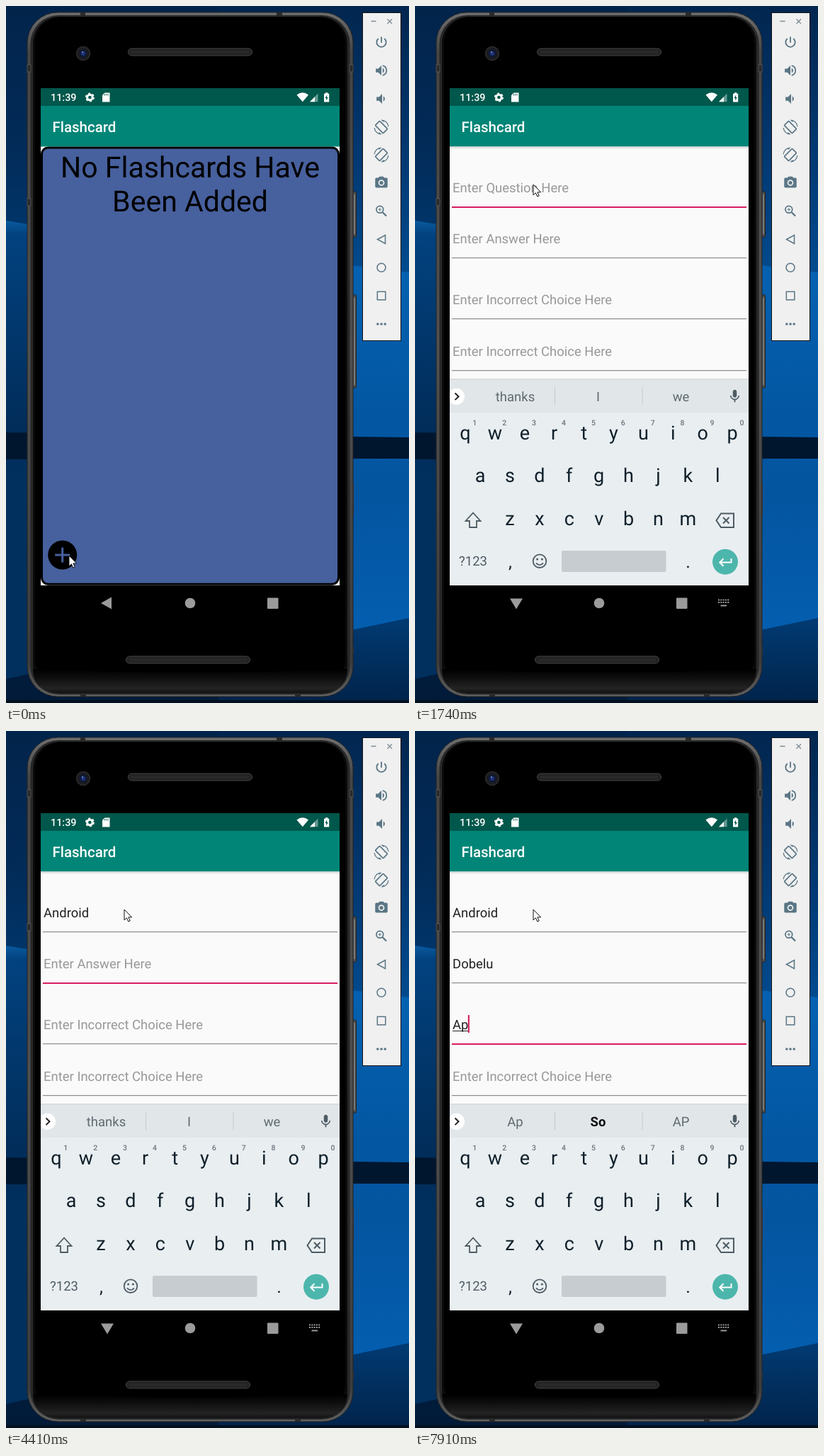
An HTML page for the animation above (8000 ms loop, 569 by 984 pixels).

```html
<!DOCTYPE html>
<html lang="en">
<head>
<meta charset="utf-8">
<title>Flashcard</title>
<style>
html, body { margin: 0; width: 100%; height: 100%; overflow: hidden; background: #000; }
svg { display: block; width: 100%; height: 100%; font-family: Roboto, "Noto Sans", sans-serif; text-rendering: geometricPrecision; }
</style>
</head>
<body>
<svg id="stage" viewBox="0 0 569 984" preserveAspectRatio="none"></svg>
<script>
const LOOP = 8000;
const TEAL = '#008577', PINK = '#d81b60', SLATE = '#5a7685', KEY = '#10202a';

const rect = (x, y, w, h, fill, more = '') => `<rect x="${x}" y="${y}" width="${w}" height="${h}" fill="${fill}" ${more}/>`;
const disc = (x, y, r, fill, more = '') => `<circle cx="${x}" cy="${y}" r="${r}" fill="${fill}" ${more}/>`;
const fill = (d, color, more = '') => `<path d="${d}" fill="${color}" ${more}/>`;
const line = (d, color, width = 2, more = '') => `<path d="${d}" fill="none" stroke="${color}" stroke-width="${width}" ${more}/>`;
const text = (s, x, y, size, color, more = '') => `<text x="${x}" y="${y}" font-size="${size}" fill="${color}" ${more}>${s}</text>`;
const mid = 'text-anchor="middle"';
const group = (id, inner, more = '') => `<g id="${id}" ${more}>${inner}</g>`;
// Icon on a 24 unit grid, centred at x, y
const icon = (x, y, size, inner) => `<g transform="translate(${x - size / 2} ${y - size / 2}) scale(${size / 24})">${inner}</g>`;
const grad = (id, ...stops) => `<linearGradient id="${id}" x1="0" y1="0" x2="0" y2="1">` +
  stops.map(([at, color]) => `<stop offset="${at}" stop-color="${color}"/>`).join('') + '</linearGradient>';

const defs = `<defs>
  ${grad('left', [0, '#02244b'], [.2, '#022b58'], [.31, '#013468'], [1, '#011a38'])}
  ${grad('right', [0, '#02264f'], [.2, '#02376f'], [.38, '#014a8e'], [.85, '#01407c'], [1, '#01234a'])}
  ${grad('leftBeam', [0, '#0a5a9f'], [.03, '#02427f'], [.45, '#012d5a'], [.6, '#01305f'], [1, '#01305e'])}
  ${grad('rightBeam', [0, '#1d8ce4'], [.025, '#0562b2'], [.4, '#0357a2'], [.6, '#0455a0'], [1, '#0460b2'])}
  ${grad('chin', [0, '#000'], [.35, '#0d0d0d'], [.8, '#242424'], [1, '#111'])}
  ${grad('rim', [0, '#6e6e6e'], [.06, '#454545'], [.5, '#505050'], [.95, '#3c3c3c'], [1, '#606060'])}
  ${grad('shade', [0, '#d4d4d4'], [1, '#fafafa'])}
  <clipPath id="screen">${rect(49, 116, 422, 702, '#000')}</clipPath>
  <clipPath id="reveal"><rect id="revealBox" x="49" y="116" width="422" height="718"/></clipPath>
</defs>`;

function wallpaper() {
  return rect(0, 0, 300, 984, 'url(#left)') + rect(300, 0, 269, 984, 'url(#right)') +
    fill('M0 303L300 352V885L0 950z', 'url(#leftBeam)') + fill('M300 343L569 376V864L300 920z', 'url(#rightBeam)') +
    fill('M0 602L569 609V639L0 640z', '#00162f') + rect(0, 980, 569, 4, '#03101f');
}

function slot(x, y) {
  return rect(x, y, 175, 10, '#222', 'rx="5" stroke="#454545"') +
    line(`M${x + 5} ${y + 5}h165`, '#303030', 4, 'stroke-dasharray="1 1"');
}

function phone() {
  const button = (y, h) => rect(488, y, 6.5, h, '#4d4d4d', 'rx="1.5" stroke="#232323"') + rect(491, y + 4, 2, h - 8, '#777');
  const band = (x, y) => rect(x, y, 5, 10, '#2b2b2b', 'stroke="#6a6a6a" stroke-width=".6"');
  return button(262, 64) + button(408, 131) + rect(488, 673, 3, 46, '#4b3b33') + rect(488, 905, 3, 10, '#444') +
    rect(30, 9, 460, 966, 'url(#rim)', 'rx="43" stroke="#222"') +
    rect(34.5, 13, 451, 959, '#262626', 'rx="40"') +
    rect(37.5, 14.5, 445, 954, '#0a0a0a', 'rx="38" stroke="#333" stroke-width=".8"') +
    rect(41, 16, 438, 942, '#000', 'rx="36"') +
    fill('M38 936Q260 946 482 936Q481 968 446 970H74Q39 968 38 936z', 'url(#chin)') +
    band(30, 83) + band(485, 83) + band(30, 272) +
    rect(105, 9, 7, 4, '#2a2a2a') + rect(382, 9, 8, 4, '#2a2a2a') + rect(105, 971, 8, 4, '#2a2a2a') + rect(408, 971, 8, 4, '#2a2a2a') +
    slot(172.5, 60) + slot(169.5, 918) +
    disc(109, 67, 9.5, '#1b1c20', 'stroke="#2c2c2c" stroke-width="1.5"') + disc(109, 67, 5.5, '#0e1838') +
    disc(109, 67, 3, '#1f3578') + disc(108, 65, 1, '#7f93c8');
}

function nav() {
  const gray = '#9b9b9b';
  let dots = '';
  for (const y of [838.5, 842]) dots += line(`M428 ${y}h15.5`, gray, 2, 'stroke-dasharray="2 1.3"');
  return group('navBack', fill('M134 843L149 834.5V851.5z', gray)) +
    disc(260, 843, 7.3, gray) + rect(369, 835.5, 15.5, 15.5, gray, 'rx="1"') +
    group('navKeys', fill('M134 836.5H152L143 851.5z', gray) + dots + line('M431.5 846.5h8.5', gray, 2));
}

function bars() {
  return rect(49, 116, 422, 25, '#00574b') + rect(49, 141, 422, 57.5, TEAL) +
    text('Flashcard', 65.4, 178, 20.5, '#fff', 'font-weight="500"');
}

function home() {
  return rect(49, 198, 422, 640, '#fafafa') + bars() +
    rect(50.5, 200, 419, 616.3, '#47609e', 'rx="9" stroke="#000" stroke-width="3"') +
    text('No Flashcards Have', 260, 242.2, 41.03, '#000', mid) +
    text('Been Added', 260, 290.3, 41.03, '#000', mid) +
    disc(79.7, 775, 20.5, '#000') + line('M69.2 775h21M79.7 764.5v21', '#47609e', 3) +
    group('dim', rect(49, 116, 422, 720, '#000', 'opacity=".1"'));
}

const rows = [
  { base: 263, hint: 'Enter Question Here' },
  { base: 335, hint: 'Enter Answer Here' },
  { base: 421, hint: 'Enter Incorrect Choice Here' },
  { base: 494, hint: 'Enter Incorrect Choice Here' }
];

function form() {
  const fields = rows.map(({ base, hint }, i) =>
    text(hint, 53.1, base, 18.46, '#8f8f8f', `id="field${i}"`) +
    `<rect id="rule${i}" x="52" width="416"/>`).join('');
  return rect(49, 198, 422, 620, '#fafafa') + bars() + rect(49, 198.5, 422, 4, 'url(#shade)') + fields +
    rect(53, 0, 0, 1, '#222', 'id="compose"') + rect(52, 0, 2.1, 25, PINK, 'id="caret"') +
    fill('M85 755H99V773.5H107.5L92 790L76.5 773.5H85z', '#000') + rect(83, 793, 18, 3, '#000') +
    disc(428, 775, 20.6, '#000') + line('M419.2 766.2L436.8 783.8M436.8 766.2L419.2 783.8', '#fff', 4.1);
}

const micPath = 'M12 14c1.66 0 3-1.34 3-3V5c0-1.66-1.34-3-3-3S9 3.34 9 5v6c0 1.66 1.34 3 3 3zm5.3-3c0 3-2.54 5.1-5.3 5.1S6.7 14 6.7 11H5c0 3.41 2.72 6.23 6 6.72V21h2v-3.28c3.28-.48 6-3.3 6-6.72h-1.7z';

function keyboard() {
  const gray = '#4d5b63';
  const keys = (chars, x, y) => [...chars].map((c, i) => text(c, x + 41.9 * i, y, 27, KEY, mid)).join('');
  const digits = [...'1234567890'].map((c, i) => text(c, 84.3 + 41.9 * i, 592, 10.5, '#6a757b', mid + ' font-weight="500"')).join('');
  const words = [141.5, 258.5, 375.5].map((x, i) => text('', x, 558, 18.5, '#5f6a70', `${mid} id="word${i}"`)).join('');
  return rect(49, 527, 422, 291, '#e9eef1') + rect(49, 527, 422, 47, '#e1e6e9') + rect(49, 526, 422, 1.5, '#d9dcde') +
    disc(58.5, 551.3, 11.5, '#fff') + line('M56.5 546.5l5 4.8-5 4.8', '#222', 2) +
    rect(197, 538, 1, 25, '#c3c9cd') + rect(320.5, 538, 1, 25, '#c3c9cd') + words +
    icon(451.5, 551, 22, fill(micPath, gray)) +
    keys('qwertyuiop', 71, 612) + digits + keys('asdfghjkl', 92, 672) + keys('zxcvbnm', 134, 733) +
    line('M82 715.5L92.5 727H87V736H77V727H71.5z', gray, 1.8) +
    line('M432 716.5H450V736H432L425.5 726.2zM435 722l8.5 8.5M443.5 722l-8.5 8.5', gray, 2) +
    text('?123', 82, 790, 18.5, gray, mid) + text(',', 134.5, 793, 25, KEY, mid) + text('.', 385.5, 793, 25, KEY, mid) +
    disc(176, 783.7, 9.3, 'none', `stroke="${gray}" stroke-width="1.8"`) + disc(172.6, 781, 1.5, gray) + disc(179.4, 781, 1.5, gray) +
    line('M171 786.3Q176 792 181 786.3', gray, 1.8) +
    rect(207, 769, 147.5, 30, '#c7ccd0', 'rx="2"') + disc(438, 784.7, 18, '#4db6ac') +
    line('M446.5 780v5.5H430.5M435.5 780.3l-5.2 5.2 5.2 5.2', '#fff', 2);
}

function status() {
  return text('11:39', 63, 134.3, 14.4, '#fff', 'font-weight="500"') +
    disc(118.4, 129, 3.8, 'none', 'stroke="#fff" stroke-width="3"') +
    disc(118.4, 129, 5.6, 'none', 'stroke="#fff" stroke-width="1.8" stroke-dasharray="2.9 2.96"') +
    fill('M139.5 122.5H146.5V135.5H136V126z', '#fff') + line('M139.5 124v2.5M141.8 124v2.5M144 124v2.5', '#00574b', .9) +
    fill('M410.5 125.5Q418.8 119 427 125.5L418.8 135.3z', '#fff') +
    fill('M429 135.3L440.5 123.5V135.3z', '#fff', 'opacity=".4"') + fill('M429 135.3L436 128.2V135.3z', '#fff') +
    fill('M451 122.3h3.3v1.4h1.9v11.8h-7.2v-11.8h2z', '#fff') + fill('M453.2 125.5l-2.7 4.6h1.7v3.4l2.6-4.6h-1.6z', '#00574b');
}

const volume = 'M3 9v6h4l5 5V4L7 9H3z', wave = 'M16.5 12c0-1.77-1.02-3.29-2.5-4.03v8.05c1.48-.73 2.5-2.25 2.5-4.02z';

function panel() {
  const x = 530;
  const arrow = 'M4.5 -9.5A10.5 10.5 0 0 1 10.5 -1H12A12 12 0 0 0 -.7 -12L3.2 -8.2z';
  const turn = flip => `<g transform="translate(12 12) scale(${flip} 1)">` +
    rect(-5, -9, 10, 18, 'none', `stroke="${SLATE}" stroke-width="1.9" rx="1" transform="rotate(-45)"`) +
    fill(arrow, SLATE) + fill(arrow, SLATE, 'transform="rotate(180)"') + '</g>';
  return rect(503.5, 9.5, 54, 463, '#f0f0f0', 'stroke="#111"') +
    line('M515.5 21.5h7M538.5 18.5l6.5 6.5M545 18.5l-6.5 6.5', '#7d8a92', 1.3) +
    icon(x, 51, 20, line('M12 3v10M7 6A8 8 0 1 0 17 6', SLATE, 2.2)) +
    icon(x, 91, 21, fill(volume + wave, SLATE) + line('M14 4.2A8 8 0 0 1 14 19.8', SLATE, 2)) +
    icon(x + 1, 131, 21, fill(volume + wave, SLATE)) +
    icon(x, 171, 21, turn(1)) + icon(x, 210, 21, turn(-1)) +
    icon(x, 249.5, 21, fill('M9 2L7.2 4H4Q2 4 2 6V18Q2 20 4 20H20Q22 20 22 18V6Q22 4 20 4H16.8L15 2z', SLATE) +
      disc(12, 12, 4, SLATE, 'stroke="#f0f0f0" stroke-width="2"')) +
    icon(x, 289.5, 21, disc(9.5, 9.5, 5.6, 'none', `stroke="${SLATE}" stroke-width="2"`) +
      line('M14 14l6 6', SLATE, 2.6) + line('M7 9.5h5M9.5 7v5', SLATE, 1.2)) +
    line('M524.5 329.5L535.5 323.5V335.5z', SLATE, 1.5) +
    disc(x, 369.3, 6, 'none', `stroke="${SLATE}" stroke-width="1.5"`) +
    rect(524.3, 403.3, 11.5, 11.5, 'none', `stroke="${SLATE}" stroke-width="1.5"`) +
    [524.8, 530, 535.2].map(cx => disc(cx, 449, 1.8, SLATE)).join('');
}

const stage = document.getElementById('stage');
stage.innerHTML = defs + wallpaper() + phone() + rect(49, 818, 422, 42, '#000') + nav() +
  `<g clip-path="url(#screen)">${group('home', home())}</g>` +
  `<g clip-path="url(#reveal)">${group('form', form())}</g>` +
  `<g clip-path="url(#screen)">${group('keys', keyboard())}</g>` + status() + panel() +
  group('mouse', fill('M0 0V15L3.4 11.8L5.8 17L8.2 16L5.9 10.9H10.6z', '#fff', 'stroke="#111" stroke-linejoin="round"'));

const $ = id => document.getElementById(id);
const set = (id, attrs) => { for (const k in attrs) $(id).setAttribute(k, attrs[k]); };
const show = (id, on) => set(id, { display: on ? 'inline' : 'none' });

const idle = ['thanks', 'I', 'we'];
// Changes that apply from each time on; focus -1 means no field
const steps = [
  [0, { open: false, shift: 0, top: 116, mouse: [89, 776], focus: -1, values: ['', '', '', ''], caret: false, composing: false, words: idle, drop: 292 }],
  [120, { open: true, shift: 16, top: 222, mouse: [89, 777] }],
  [260, { shift: 3, top: 119 }],
  [400, { shift: 0, top: 116 }],
  [540, { mouse: [103, 690] }],
  [670, { mouse: [135, 490] }],
  [810, { mouse: [160, 310] }],
  [950, { mouse: [167, 252] }],
  [1200, { focus: 0, caret: true }],
  [1340, { drop: 150 }],
  [1480, { drop: 24 }],
  [1610, { drop: 0 }],
  [1740, { caret: false }],
  [2270, { caret: true }],
  [2400, typed(0, 'A', 'A', 'I', 'And')],
  [2660, typed(0, 'An', 'An', 'And', 'Any')],
  [2940, typed(0, 'And', 'And', 'Lorvik', 'Lovi')],
  [3220, typed(0, 'Andr', 'Andr', 'Android', 'Androids')],
  [3350, typed(0, 'Andro', 'Andro', 'Android', 'androgynous')],
  [3610, typed(0, 'Androi', 'Androi', 'Android', 'Androids')],
  [3740, typed(0, 'Android', 'Android', 'Androids', 'androgynous')],
  [4010, { focus: 1, composing: false, caret: true }],
  [4130, { words: idle }],
  [4410, { caret: false }],
  [4940, typed(1, 'D', 'D', 'Do', 'Does')],
  [5220, typed(1, 'Do', 'Do', 'Done', 'Does')],
  [5350, typed(1, 'Dob', 'Dob', 'Dobelu', 'Doubt')],
  [5490, typed(1, 'Dobe', 'Dobe', 'Dobelu', 'Dobes')],
  [5770, typed(1, 'Dobel', 'Dobel', 'Dobelu', 'Dobels')],
  [5890, typed(1, 'Dobelu', 'Dobelu', 'Dobelud', "Dobelu's")],
  [6410, { caret: false }],
  [6680, { focus: 2, composing: false, caret: true }],
  [6830, { words: idle }],
  [7210, { caret: false }],
  [7640, typed(2, 'A', 'A', 'I', 'And')],
  [7910, typed(2, 'Ap', 'Ap', 'So', 'AP')]
];

function typed(field, value, ...words) {
  return { field, value, words, composing: true, caret: true };
}

function stateAt(t) {
  const s = {};
  for (const [at, change] of steps) {
    if (at > t) break;
    Object.assign(s, change);
    if ('value' in change) {
      s.values = s.values.slice();
      s.values[change.field] = change.value;
    }
  }
  return s;
}

function draw(t) {
  const s = stateAt(t), moving = s.open && s.shift > 0, keysUp = s.drop < 292;
  show('home', !s.open || moving);
  show('dim', moving);
  set('home', { transform: `translate(0 ${-s.shift * 7 / 16})` });
  show('form', s.open);
  set('form', { transform: `translate(0 ${s.shift})` });
  set('revealBox', { y: s.top });
  show('keys', keysUp);
  set('keys', { transform: `translate(0 ${s.drop})` });
  show('navBack', !keysUp);
  show('navKeys', keysUp);
  set('mouse', { transform: `translate(${s.mouse})` });

  rows.forEach(({ base, hint }, i) => {
    const active = s.focus === i;
    $('field' + i).textContent = s.values[i] || hint;
    set('field' + i, { fill: s.values[i] ? '#212121' : '#989898' });
    set('rule' + i, { y: base + 20, height: active ? 2 : 1.2, fill: active ? PINK : '#8b8b8b' });
  });
  show('caret', s.caret);
  show('compose', s.composing);
  if (s.focus >= 0) {
    const { base } = rows[s.focus];
    const width = s.values[s.focus] ? $('field' + s.focus).getComputedTextLength() : 0;
    set('caret', { x: 52.4 + width, y: base - 20 });
    set('compose', { y: base + 2, width });
  }
  s.words.forEach((word, i) => {
    const strong = word === 'So';
    $('word' + i).textContent = word;
    set('word' + i, { 'font-weight': strong ? 700 : 400, fill: strong ? '#111' : '#5f6a70' });
  });
}

const start = performance.now();
function tick() {
  draw((performance.now() - start) % LOOP);
  requestAnimationFrame(tick);
}
tick();
</script>
</body>
</html>
```
